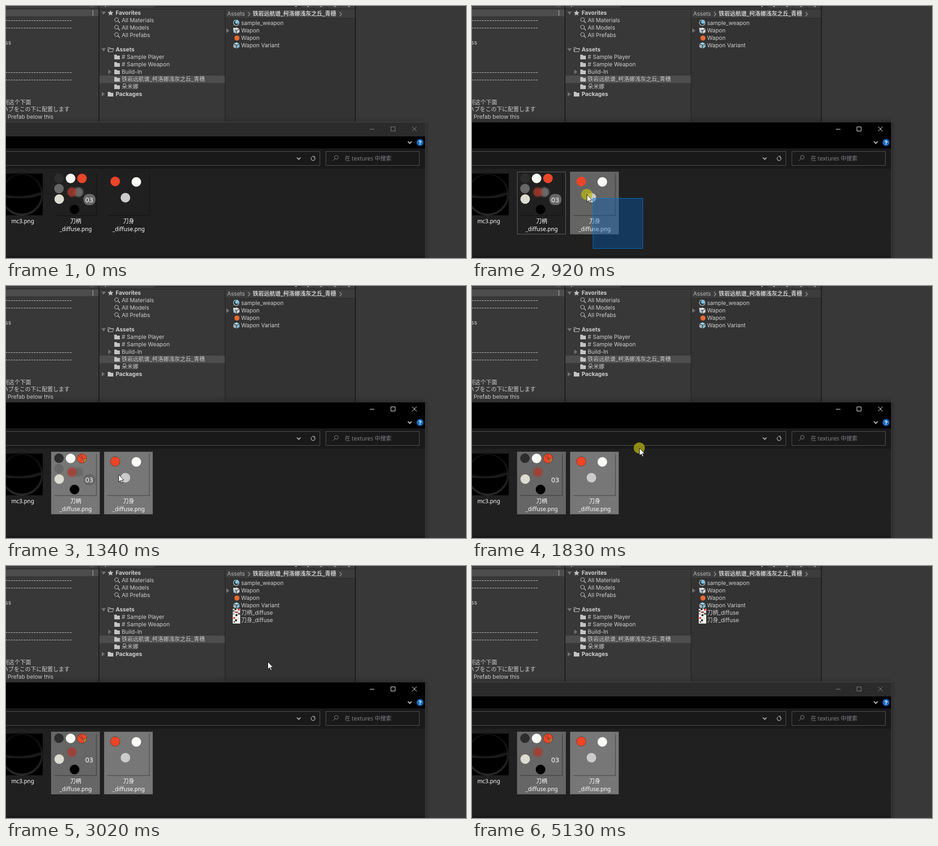
Recreate the animation shown at these times as an HTML page. Size 990 by 543 pixels, loop 5.17 s.

```html
<!DOCTYPE html>
<html lang="zh">
<head>
<meta charset="utf-8">
<style>
html, body { margin: 0; width: 990px; height: 543px; overflow: hidden; background: #383838; }
svg { display: block; }
text { font: 12px Inter, "Noto Sans CJK SC", "Noto Sans CJK", sans-serif; fill: #cfcfcf; white-space: pre; }
.b { font-weight: 700; }
.end { text-anchor: end; }
.file { font-family: "Noto Sans", "Noto Sans CJK SC", "Noto Sans CJK", sans-serif; fill: #fff; text-anchor: middle; }
.line { fill: none; stroke: #c4c4c4; }
.on .rim { stroke: rgba(40, 25, 20, .7); stroke-width: .7; }
.sliver { display: none; }
.on .sliver { display: inline; }
</style>
</head>
<body>
<svg id="stage" width="990" height="543" viewBox="0 0 990 543"></svg>
<script>
const LOOP = 5170;
const project = '铁岩远航谱_柯洛娜浅灰之丘_青穗';

const rect = (x, y, w, h, fill, more = '') =>
  `<rect x="${x}" y="${y}" width="${w}" height="${h}" fill="${fill}" ${more}/>`;
const dot = (x, y, r, fill, more = '') =>
  `<circle cx="${x}" cy="${y}" r="${r}" fill="${fill}" ${more}/>`;
const path = (d, more = 'class="line"') => `<path d="${d}" ${more}/>`;
const text = (x, y, s, cls = '', more = '') =>
  `<text x="${x}" y="${y}" class="${cls}" ${more}>${s}</text>`;
const box = (x, y, w, h, stroke, fill = 'none') =>
  rect(x + .5, y + .5, w - 1, h - 1, fill, `stroke="${stroke}"`);

// Icons, placed by their left edge or centre and the row's middle
const folder = (x, y) =>
  path(`M${x} ${y - 5}h5l1.5 2h5.5v8h-12z`, 'fill="#c4c4c4"');
const openFolder = (x, y) =>
  path(`M${x + .5} ${y + 4.5}v-9h4l1.5 2h5v2M${x + .5} ${y + 4.5}l2.5-6.5h10l-2.5 6.5z`);
const lens = (x, y) => path(`M${x + 8} ${y + 1}l4 4.5`, 'class="line" stroke-width="1.6"') +
  dot(x + 4.8, y - 1.5, 4, 'none', 'class="line" stroke-width="1.2"');
const down = (x, y) => path(`M${x - 5} ${y - 3}h10l-5 7z`, 'fill="#707070"');
const right = (x, y) => path(`M${x - 3} ${y - 5}v10l7-5z`, 'fill="#707070"');
const cube = (x, y, top, left, side) =>
  path(`M${x} ${y - 6.5}l6 2.5-6 3-6-3z`, `fill="${top}"`) +
  path(`M${x - 6.5} ${y - 2.8}l5.8 2.8v6.5l-5.8-3z`, `fill="${left}"`) +
  path(`M${x + 6.5} ${y - 2.8}l-5.8 2.8v6.5l5.8-3z`, `fill="${side}"`);
const chevron = (x, y, c = '#aaa') =>
  path(`M${x - 4} ${y - 2}l4 4 4-4`, `fill="none" stroke="${c}" stroke-width="2"`);

function editor() {
  const rows = [
    ['Favorites', 15, 236, 'b'], ['All Materials', 31, 249], ['All Models', 47, 249],
    ['All Prefabs', 63, 249], ['Assets', 94, 236, 'b'], ['# Sample Player', 110, 249],
    ['# Sample Weapon', 126, 249], ['Build-In', 142, 249], [project, 158, 249],
    ['朵米娜', 174, 249], ['Packages', 190, 236, 'b'],
    ['sample_weapon', 37, 506], ['Wapon', 53, 506], ['Wapon', 69, 506], ['Wapon Variant', 85, 506]
  ];
  const dashes = '-'.repeat(40);
  return rect(0, 0, 990, 543, '#383838') +
    rect(0, 0, 752, 6, '#3c3c3c') + rect(0, 6, 752, 1, '#202020') +
    rect(180, 0, 11, 3, '#4a4a4a') + rect(213, 0, 2, 2, '#aaa') + rect(320, 0, 315, 3, '#2a2a2a') +
    [622, 648, 676, 706, 736].map(x => rect(x, 0, 4, 2, '#999') + rect(x + 14, 0, 1, 6, '#292929')).join('') +
    rect(0, 7, 199, 15, '#4d4d4d') +
    [11, 15, 19].map(y => rect(186, y - 1, 2, 2, '#c4c4c4')).join('') +
    [34.5, 50.5, 146.5, 162.5].map(y => text(142, y, dashes, 'end')).join('') +
    text(11, 83, 'class', 'end') + text(54, 212, '到这个下面', 'end') +
    text(137, 227, 'ハブをこの下に配置します', 'end') +
    text(102, 243, 'your Prefab below this', 'end') +
    rect(199, 0, 2, 251, '#1c1c1c') +
    rect(472, 7, 279, 244, '#333') + rect(472, 7, 279, 19, '#3c3c3c') + rect(472, 26, 279, 1, '#252525') +
    rect(471, 7, 1, 244, '#1e1e1e') + rect(751, 0, 2, 251, '#1c1c1c') +
    rect(201, 150, 270, 16, '#4d4d4d') +
    rows.map(([s, y, x, cls]) => text(x, y + 4, s, cls)).join('') +
    path('M225 9l1.8 4 4.4.4-3.3 2.9 1 4.3-3.9-2.3-3.9 2.3 1-4.3-3.3-2.9 4.4-.4z', 'fill="#c4c4c4"') +
    [31, 47, 63].map(y => lens(233, y)).join('') + openFolder(219, 94) +
    [110, 126, 142, 158, 174].map(y => folder(233, y)).join('') + folder(219, 190) +
    down(210, 15) + down(210, 94) + right(223, 142) + right(209, 190) + right(477, 53) +
    text(476, 21, 'Assets', '', 'style="fill:#b8b8b8"') + text(531, 21, project, 'b') +
    [521, 718].map(x => path(`M${x} 13l4 4.5-4 4.5`, 'fill="none" stroke="#999" stroke-width="1.5"')).join('') +
    dot(495.5, 36, 6, '#263845', 'stroke="#c9d6dc" stroke-width="1.2"') + dot(497, 34.5, 3.8, '#7fc3ea') +
    cube(496, 53, '#e8e8e8', '#9cc4da', '#d5d5d5') + rect(489, 47, 4, 5, '#d5d5d5') +
    dot(497, 69, 5.5, '#ea6a32') +
    cube(496, 85, '#a6d8f0', '#d8e6ec', '#7fbbd8') +
    path('M490 82l6 7M490 85l5 6M493 82l4 4', 'stroke="#333" stroke-width=".8"');
}

function imported() {
  return rect(488, 92, 16, 16, '#f0f0ee') + rect(488, 95, 4, 4, '#777') + rect(492, 92, 4, 3, '#333') +
    rect(499, 92, 4, 4, '#dd4a30') + rect(493, 98, 6, 3, '#9a4a40') + rect(499, 101, 5, 4, '#666') +
    rect(488, 101, 4, 4, '#b8b8b0') + rect(494, 104, 4, 4, '#222') +
    rect(488, 108, 16, 16, '#f6f4f0') + rect(489, 110, 4, 4, '#e04a2c') +
    rect(493, 115, 4, 4, '#222') + rect(498, 111, 3, 3, '#ddd') + rect(490, 119, 3, 3, '#555') +
    text(506, 105, '刀柄_diffuse') + text(506, 121, '刀身_diffuse');
}

const thumbEdge = x => path(`M${x} 451.5h90.5v-90`, 'fill="none" stroke="#000" stroke-opacity=".35" stroke-width="1.5"');
const label = (x, name) => text(x, 468, name, 'file') + text(x, 485, '_diffuse.png', 'file');

function handle() {
  return thumbEdge(104) +
    dot(114, 371, 10.3, '#2d2d2d') + dot(139, 371.5, 10.3, '#fafbf4') +
    dot(163.5, 371.5, 10.3, '#e84729', 'class="rim"') +
    path('M164 373l9-1-2 6-4 3z', 'class="sliver" fill="#d08a30"') +
    path('M156 365l9 8 8-1M165 373l3 8M161 362l4 11M165 373l6 5', 'class="sliver" fill="none" stroke="#44302a" stroke-width=".8"') +
    dot(114, 393.5, 10.3, '#676767') + dot(114.5, 416, 10.3, '#dcddd0') +
    dot(156, 401, 10.3, '#686868', 'filter="url(#soft)"') +
    dot(142, 401, 10.3, '#a83a2d', 'filter="url(#soft)" opacity=".8"') +
    rect(166.5, 405, 26, 24, '#676767', 'rx="11"') +
    text(179, 422.5, '03', '', 'style="font:500 15px \'Noto Sans\',sans-serif;fill:#fff;text-anchor:middle"') +
    dot(147.5, 438.5, 10.3, '#000', 'class="rim"') + label(150, '刀柄');
}

function blade() {
  return thumbEdge(218) + dot(235, 378, 10.3, '#ee4427', 'class="rim"') +
    dot(280.5, 379, 10.3, '#fafaf6') + dot(257, 413, 10.3, '#cbcbcb') + label(264, '刀身');
}

function explorer() {
  return rect(903, 251, 9, 292, 'url(#side)') + '<g id="shade">' + rect(0, 236, 902, 15, 'url(#above)') + '</g>' +
    rect(0, 250, 903, 293, '#202020') + rect(0, 281, 902, 26, '#000') +
    '<g id="title"></g>' + rect(0, 307, 902, 44, '#191919') + rect(0, 538, 902, 5, '#191919') +
    rect(902, 251, 1, 292, '#3e3e3e') +
    chevron(869, 294, '#c4c4c4') + dot(891, 294, 7.5, '#1769bd') +
    text(891, 298.5, '?', 'b', 'style="fill:#fff;text-anchor:middle"') +
    box(-4, 313, 680, 31, '#555') + box(688, 313, 202, 31, '#555') + chevron(630, 328.5) +
    path('M663.5 325.5a4.2 4.2 0 1 1-5.2 0M659 324h4.5v4', 'fill="none" stroke="#aaa" stroke-width="1.4"') +
    dot(711, 326, 4, 'none', 'stroke="#888"') + path('M708 329l-4.5 4.5', 'stroke="#888"') +
    text(729, 333, '在 textures 中搜索', 'file', 'style="fill:#828288;text-anchor:start"') +
    rect(-11, 361, 90, 90, '#000') +
    dot(34, 406, 43.5, 'none', 'stroke="url(#glow)" stroke-width="3" filter="url(#faint)"') +
    path('M-9 408Q35 420 77 403', 'fill="none" stroke="#1c1c1c" stroke-width="6" filter="url(#soft)"') +
    text(36, 468, 'mc3.png', 'file') +
    '<g id="plate1"></g><g id="item1">' + handle() + '</g>' +
    '<g id="plate2"></g><g id="item2">' + blade() + '</g>';
}

const fade = (id, x2, y2, stops) => `<linearGradient id="${id}" x2="${x2}" y2="${y2}">` +
  stops.map(([c, a], i) => `<stop offset="${i}" stop-color="${c}" stop-opacity="${a}"/>`).join('') + '</linearGradient>';
const blur = (id, size) => `<filter id="${id}"><feGaussianBlur stdDeviation="${size}"/></filter>`;

const $ = id => document.getElementById(id);
$('stage').innerHTML = '<defs>' + blur('soft', 1.8) + blur('faint', .8) +
  fade('side', 1, 0, [['#000', .18], ['#000', 0]]) + fade('above', 0, 1, [['#000', 0], ['#000', .18]]) +
  fade('glow', 0, 1, [['#0c0c0c', 1], ['#3a3a3a', 1]]) + '</defs>' +
  editor() + '<g id="imported">' + imported() + '</g>' + explorer() +
  '<g id="marquee"></g><g id="pointer">' + dot(-1, -1, 12, 'rgb(190,185,17)', 'id="press" opacity=".7"') +
  path('M-.5-.5v16l3.8-3.5 2.6 6 2.4-1-2.6-5.8h5z', 'fill="#fff" stroke="#000" stroke-width=".9"') + '</g>';

// Pointer track: time, x, y
const track = [
  [460, 368, 523], [490, 368, 523], [877, 260, 414], [920, 248, 407], [1030, 196, 398],
  [1130, 180, 400], [1340, 243, 407], [1460, 271, 411], [1560, 271, 411], [1620, 273, 411],
  [1770, 273, 411], [1960, 547, 221], [2100, 574, 171], [2260, 575, 215], [2400, 575, 215],
  [2590, 567, 208], [2990, 567, 208], [3020, 564, 207], [3350, 547, 270], [3650, 547, 270],
  [3910, 579, 224], [4240, 579, 224], [4540, 667, 478]
];

function pointerAt(t) {
  const i = track.findIndex(k => k[0] > t);
  if (i < 1) return track[i ? track.length - 1 : 0].slice(1);
  const [t0, x0, y0] = track[i - 1], [t1, x1, y1] = track[i];
  const p = (t - t0) / (t1 - t0);
  return [Math.round(x0 + (x1 - x0) * p), Math.round(y0 + (y1 - y0) * p)];
}

const show = (id, on) => { $(id).style.display = on ? '' : 'none'; };

function draw(t) {
  const active = t >= 460 && t < 5130;
  const during = (a, b) => t >= a && t < b;
  const [x, y] = pointerAt(t);
  const ink = active ? '#fff' : '#898989';

  $('title').innerHTML = rect(0, 250, 902, 31, active ? '#000' : '#2b2b2b') +
    rect(0, 250, 903, 1, active ? '#292929' : '#454545') +
    path('M783 265.5h10M828.5 260.5h9v9h-9zM874 260l10 10M884 260l-10 10', `fill="none" stroke="${ink}"`);
  $('shade').style.opacity = active ? 1 : .5;

  show('imported', t >= 2590);
  show('pointer', during(460, 4540));
  $('pointer').setAttribute('transform', `translate(${x} ${y})`);
  show('press', during(460, 1190) || during(1560, 2420));

  const on1 = t >= 1050, on2 = t >= 715;
  const released = t >= 1190;
  $('plate1').innerHTML = on1 ? box(97, 357, 105, 135, '#666', released && t < 1790 ? '#777' : '#666')
    : active ? box(97, 357, 105, 135, '#666') : '';
  $('plate2').innerHTML = on2 ? box(211, 357, 105, 135, '#666', released ? '#777' : '#646464') : '';
  $('item1').setAttribute('class', on1 ? 'on' : '');
  $('item2').setAttribute('class', on2 && released ? 'on' : '');

  // The selection box trails the pointer slightly
  const [mx, my] = pointerAt(t - 43);
  $('marquee').innerHTML = during(540, 1190)
    ? box(mx, my, 368 - mx, 523 - my, '#0078d7', 'rgba(0,95,190,.38)') : '';
}

function tick() {
  draw(performance.now() % LOOP);
  requestAnimationFrame(tick);
}
tick();
</script>
</body>
</html>
```
